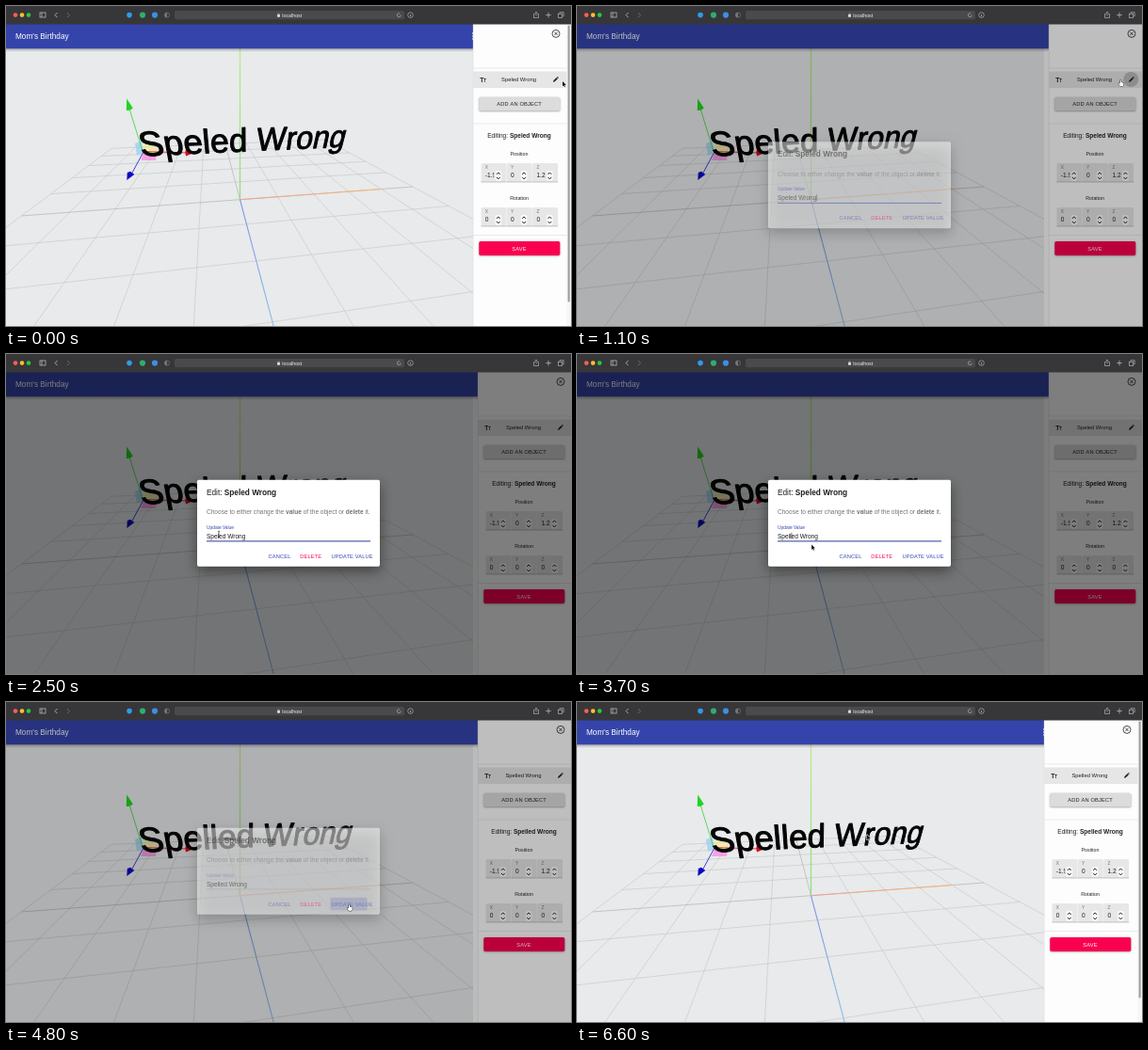
An HTML page with a canvas for the animation above (6700 ms loop, 600x340 px).

```html
<!DOCTYPE html>
<html lang="en">
<head>
<meta charset="utf-8">
<title>Scene editor</title>
<style>
  html, body { margin: 0; width: 100%; height: 100%; overflow: hidden; background: #fff; }
  canvas { display: block; width: 600px; height: 340px; }
</style>
</head>
<body>
<canvas id="stage" width="600" height="340"></canvas>
<script>
const ctx = document.getElementById('stage').getContext('2d');
const LOOP = 6700, STEP = 100;
const FONT = '"Liberation Sans", Arial, sans-serif';
const BLUE = '#3545ab', RED = '#f50057', INK = '#222';
const OLD = 'Speled Wrong', FIXED = 'Spelled Wrong';

// ---- drawing helpers ----
function rect(x, y, w, h, color, r = 0) {
  ctx.fillStyle = color;
  ctx.beginPath();
  ctx.roundRect(x, y, w, h, r);
  ctx.fill();
}

function shadowRect(x, y, w, h, color, r, blur, drop, alpha) {
  ctx.save();
  ctx.shadowColor = `rgba(0,0,0,${alpha})`;
  ctx.shadowBlur = blur;
  ctx.shadowOffsetY = drop;
  rect(x, y, w, h, color, r);
  ctx.restore();
}

function disc(x, y, r, color) {
  ctx.fillStyle = color;
  ctx.beginPath();
  ctx.arc(x, y, r, 0, 7);
  ctx.fill();
}

function ring(x, y, r, color, width) {
  ctx.strokeStyle = color;
  ctx.lineWidth = width;
  ctx.beginPath();
  ctx.arc(x, y, r, 0, 7);
  ctx.stroke();
}

function trace(pts) {
  ctx.beginPath();
  pts.forEach(([x, y], i) => i ? ctx.lineTo(x, y) : ctx.moveTo(x, y));
}

function line(pts, color, width = 0.7) {
  trace(pts);
  ctx.strokeStyle = color;
  ctx.lineWidth = width;
  ctx.stroke();
}

function poly(pts, color) {
  trace(pts);
  ctx.closePath();
  ctx.fillStyle = color;
  ctx.fill();
}

// Draws [text, bold] runs one after another.
function runs(parts, x, y, size, color, { center = false, spacing = 0 } = {}) {
  const font = bold => `${bold ? 'bold ' : ''}${size}px ${FONT}`;
  ctx.letterSpacing = spacing + 'px';
  const widths = parts.map(([s, bold]) => {
    ctx.font = font(bold);
    return ctx.measureText(s).width;
  });
  if (center) x -= widths.reduce((a, b) => a + b) / 2;
  ctx.fillStyle = color;
  parts.forEach(([s, bold], i) => {
    ctx.font = font(bold);
    ctx.fillText(s, x, y);
    x += widths[i];
  });
  ctx.letterSpacing = '0px';
}

const text = (s, x, y, size, color, opt) => runs([[s, false]], x, y, size, color, opt);

// ---- browser bar ----
function browser() {
  rect(0, 0, 600, 19.4, '#37373a');
  ['#ff5f57', '#febc2e', '#28c840'].forEach((c, i) => disc(10 + i * 7, 9.6, 2.3, c));

  const pale = '#c4c4c6';
  ctx.strokeStyle = pale;
  ctx.lineWidth = 0.7;
  ctx.strokeRect(36, 7, 6, 5);
  line([[38, 7], [38, 12]], pale);
  line([[54.5, 7], [52, 9.6], [54.5, 12.2]], pale, 0.8);
  line([[65, 7], [67.5, 9.6], [65, 12.2]], '#77777a', 0.8);

  disc(131, 9.6, 2.8, '#2f9be8');
  disc(145, 9.6, 3.1, '#2fae6b');
  disc(158, 9.6, 3.1, '#3d8fe0');
  ring(171, 9.6, 2.6, '#77777a', 0.7);
  ctx.fillStyle = '#77777a';
  ctx.beginPath();
  ctx.arc(171, 9.6, 2.6, Math.PI / 2, Math.PI * 1.5);
  ctx.fill();

  rect(179, 5, 244, 9.3, '#4a4a4c', 2);
  rect(288, 9, 3, 2.7, '#ddd', 0.4);
  ctx.strokeStyle = '#ddd';
  ctx.lineWidth = 0.5;
  ctx.beginPath();
  ctx.arc(289.5, 9, 1, Math.PI, 0);
  ctx.stroke();
  text('localhost', 293.3, 11.6, 5.3, '#f2f2f2');

  ctx.strokeStyle = pale;
  ctx.lineWidth = 0.6;
  ctx.beginPath();
  ctx.arc(417.3, 9.7, 1.9, 0, 5.2);
  ctx.stroke();
  ring(429.5, 9.6, 2.8, pale, 0.6);
  line([[429.5, 9], [429.5, 11.2]], pale);

  line([[561.8, 8.5], [560.5, 8.5], [560.5, 12.5], [565.5, 12.5], [565.5, 8.5], [564.2, 8.5]], pale, 0.6);
  line([[563, 10.5], [563, 6.2]], pale, 0.6);
  line([[561.7, 7.4], [563, 6.1], [564.3, 7.4]], pale, 0.6);
  line([[573.2, 9.6], [578.8, 9.6]], pale);
  line([[576, 6.8], [576, 12.4]], pale);
  ctx.lineWidth = 0.6;
  ctx.strokeRect(586.5, 8.2, 4.2, 4.2);
  line([[588, 8], [588, 6.7], [592.2, 6.7], [592.2, 10.8], [591, 10.8]], pale, 0.6);
}

// ---- 3D scene ----
const YAW = 8 * Math.PI / 180, PITCH = Math.asin(0.53);
const FOCAL = 209, DIST = 5.05, CX = 248.5, CY = 205.7;

function project(x, y, z) {
  const right = x * Math.cos(YAW) + z * Math.sin(YAW);
  const ahead = x * Math.sin(YAW) - z * Math.cos(YAW);
  const depth = DIST + ahead * Math.cos(PITCH) - y * Math.sin(PITCH);
  const up = ahead * Math.sin(PITCH) + y * Math.cos(PITCH);
  return [CX + FOCAL * right / depth, CY - FOCAL * up / depth];
}

function axis(end, from, to, width) {
  const a = project(0, 0, 0), b = project(...end);
  const g = ctx.createLinearGradient(...a, ...b);
  g.addColorStop(0, from);
  g.addColorStop(1, to);
  line([a, b], g, width);
}

function gizmo() {
  poly([[137, 146], [144, 143.5], [145.5, 156], [139, 158.5]], 'rgba(130,200,240,.6)');
  poly([[146, 144], [159, 144.5], [160.5, 156], [147, 156]], 'rgba(245,235,120,.5)');
  poly([[146, 157], [160, 157], [159, 164], [143, 164]], 'rgba(255,90,220,.5)');
  line([[131, 109], [145, 154]], '#35d435', 0.8);
  line([[146, 154.5], [192, 156]], '#e81818', 0.8);
  line([[146, 155], [133, 179]], '#1515d8', 0.8);
  poly([[128.2, 98.5], [134.8, 108.5], [131.5, 110.8], [127.8, 111]], '#1ed61e');
  poly([[200.5, 155.6], [191, 151.6], [190.3, 155.6], [191, 159.6]], '#d60a1c');
  poly([[128.3, 185], [128.8, 177], [132, 175.8], [136.3, 179]], '#0808c4');
}

// Each glyph gets the camera's local affine map at its centre.
function solidText(s) {
  const em = 0.72, base = 1.265, px = 100, h = 0.02;
  let x = -2.08;
  ctx.font = `${px}px ${FONT}`;
  ctx.fillStyle = ctx.strokeStyle = '#050505';
  ctx.lineWidth = 3;
  ctx.lineJoin = 'round';
  for (const ch of s) {
    const w = ctx.measureText(ch).width, k = em / px;
    const mx = x + w * k / 2, my = base + em * 0.25;
    const slope = (p, q) => [(q[0] - p[0]) / (2 * h) * k, (q[1] - p[1]) / (2 * h) * k];
    const dx = slope(project(mx - h, my, 0), project(mx + h, my, 0));
    const dy = slope(project(mx, my + h, 0), project(mx, my - h, 0));
    ctx.save();
    ctx.transform(...dx, ...dy, ...project(mx, my, 0));
    ctx.fillText(ch, -w / 2, px * 0.25);
    ctx.strokeText(ch, -w / 2, px * 0.25);
    ctx.restore();
    x += w * k;
  }
}

function scene(label) {
  ctx.save();
  ctx.beginPath();
  ctx.rect(0, 45, 496, 295);
  ctx.clip();
  rect(0, 45, 496, 295, '#e8eaec');
  for (let i = -5; i <= 5; i++) {
    const c = i ? '#c3c4c6' : '#a9aaac';
    line([project(i, 0, -5), project(i, 0, 5)], c, 0.6);
    line([project(-5, 0, i), project(5, 0, i)], c, 0.6);
  }
  axis([0, 3.2, 0], '#8fe07a', '#c3ea8c', 1.3);
  axis([4, 0, 0], '#f59a90', '#ffb85c', 0.9);
  axis([0, 0, 3.2], '#6f8ff0', '#8cc6f5', 0.9);
  gizmo();
  solidText(label);
  ctx.restore();
}

function header(edge) {
  const g = ctx.createLinearGradient(0, 45, 0, 49);
  g.addColorStop(0, 'rgba(0,0,0,.28)');
  g.addColorStop(1, 'rgba(0,0,0,0)');
  rect(0, 45, edge, 4, g);
  rect(0, 19, edge, 26.3, '#3444aa');
  text("Mom's Birthday", 10, 35, 8.25, '#fff');
  if (edge === 496) for (const y of [29, 32, 35]) disc(495.8, y, 0.8, '#fff');
}

// ---- side panel ----
function pencil(x, y) {
  ctx.save();
  ctx.translate(x, y);
  ctx.rotate(-Math.PI / 4);
  rect(-2.6, -0.9, 4.7, 1.8, INK);
  rect(2.5, -0.9, 1, 1.8, INK, 0.3);
  poly([[-2.6, -0.9], [-4, 0], [-2.6, 0.9]], INK);
  ctx.restore();
}

function field(x, y, name, value) {
  rect(x, y, 27, 20, '#e7e7e7', [1.5, 1.5, 0, 0]);
  line([[x, y + 20], [x + 27, y + 20]], '#8c8c8c', 0.5);
  text(name, x + 4.3, y + 5.8, 4.8, '#757575');
  ctx.save();
  ctx.beginPath();
  ctx.rect(x, y, 13.8, 20);
  ctx.clip();
  text(value, x + 4.3, y + 15.3, 6.6, INK);
  ctx.restore();
  const cx = x + 18.3, cy = y + 13.4;
  rect(cx - 3.4, cy - 5.4, 6.8, 10.8, '#fafafa', 2);
  line([[cx - 1.9, cy - 1.5], [cx, cy - 3.5], [cx + 1.9, cy - 1.5]], '#222', 1);
  line([[cx - 1.9, cy + 1.5], [cx, cy + 3.5], [cx + 1.9, cy + 1.5]], '#222', 1);
}

function fields(title, y, values) {
  text(title, 545, y - 8, 5.3, INK, { center: true });
  values.forEach((v, i) => field(504.5 + i * 27.3, y, 'XYZ'[i], v));
}

function button(label, y, h, fill, color) {
  shadowRect(502.3, y, 86, h, fill, 1.7, 2, 0.8, 0.35);
  text(label, 545, y + h / 2 + 2, 5.7, color, { center: true, spacing: 0.16 });
}

function panel(label, shift, ripple) {
  rect(496 + shift, 19, 104, 321, '#fdfdfd');
  line([[496.2 + shift, 19], [496.2 + shift, 340]], '#d8d8d8', 0.5);
  if (!shift) {
    rect(595.5, 19, 4.5, 321, '#f6f6f6');
    rect(596.6, 20.5, 2.1, 294, '#9e9e9e', 1);
  }
  ctx.save();
  ctx.translate(shift, 0);
  ring(584, 29.4, 4, INK, 0.8);
  line([[582.3, 27.7], [585.7, 31.1]], INK, 0.8);
  line([[585.7, 27.7], [582.3, 31.1]], INK, 0.8);
  const end = shift ? 600 : 595.5;
  for (const y of [66, 125, 243.5]) line([[496, y], [end, y]], '#dedede', 0.6);

  rect(496, 69.5, end - 496, 17.5, '#e6e6e6');
  runs([['T', true]], 503.2, 80.6, 6.8, INK);
  runs([['T', true]], 507.2, 80.6, 4.6, INK);
  text(label, 544.5, 80, 5.83, INK, { center: true });
  if (ripple) disc(583.3, 78, ripple, 'rgba(0,0,0,.18)');
  pencil(583.8, 78);

  button('ADD AN OBJECT', 96.8, 14.5, '#dcdcdc', INK);
  runs([['Editing: ', false], [label, true]], 545, 139.8, 6.55, INK, { center: true });
  fields('Position', 167, ['-1.9', '0', '1.2']);
  fields('Rotation', 214, ['0', '0', '0']);
  button('SAVE', 250, 15, '#fa0050', '#fff');
  ctx.restore();
}

// ---- dialog ----
function dialog(t) {
  const value = t < 3500 ? OLD : FIXED;
  const blurred = t >= 4600;
  ctx.save();
  ctx.translate(0, t < 1500 ? 0 : -10.5);
  shadowRect(203, 144.3, 194, 92, '#fff', 1.7, 14, 5, 0.45);
  runs([['Edit: ', false], [OLD, true]], 213, 160.2, 8.25, '#1c1c1c');
  runs([['Choose to either change the ', false], ['value', true], [' of the object or ', false],
    ['delete', true], [' it.', false]], 213, 180.8, 6.55, '#757575');
  text('Update Value', 213, 196.2, 4.85, blurred ? '#6a74b0' : BLUE);
  text(value, 213, 206, 6.55, '#1c1c1c');

  const shrink = t < 4600 ? 1 : t < 4700 ? 0.65 : t < 4800 ? 0.285 : 0;
  line([[213, 209.4], [387, 209.4]], '#8f8f8f', 0.5);
  if (shrink) line([[300 - 87 * shrink, 209.4], [300 + 87 * shrink, 209.4]], BLUE, 0.9);

  const chars = t < 1600 ? 12 : t < 3500 ? 4 : 5;
  const caretOn = t < 1600 || (t >= 2600 && t < 2900) || (t >= 3500 && t < 4000) || t === 4500;
  if (caretOn) {
    ctx.font = `6.55px ${FONT}`;
    const x = 213.3 + ctx.measureText(value.slice(0, chars)).width;
    line([[x, 200.2], [x, 207.2]], INK, 0.6);
  }

  if (t >= 4600) rect(344.5, 218.3, 39, 13.4, 'rgba(63,81,181,.36)', 1.5);
  const opt = { spacing: 0.15 };
  text('CANCEL', 278.5, 227.2, 5.7, BLUE, opt);
  text('DELETE', 312.2, 227.2, 5.7, RED, opt);
  text('UPDATE VALUE', 345.5, 227.2, 5.7, BLUE, opt);
  ctx.restore();
}

// ---- pointer ----
const PATH = [[0, 591, 80], [300, 591, 80], [800, 580, 80], [1000, 579, 80], [1200, 574.5, 77.5],
  [1500, 560, 86], [2300, 226, 191.5], [3600, 226, 191.5], [3900, 315, 234], [4300, 364.5, 215],
  [4900, 364, 215.5], [5200, 364, 215.5], [6000, 308, 141], [LOOP, 308, 141]];

function pointerAt(t) {
  const i = PATH.findIndex((p, n) => n && t <= p[0]);
  const [t0, x0, y0] = PATH[i - 1], [t1, x1, y1] = PATH[i];
  const u = (t - t0) / (t1 - t0), k = u * u * (3 - 2 * u);
  return [x0 + (x1 - x0) * k, y0 + (y1 - y0) * k];
}

function pointer(t) {
  ctx.save();
  ctx.translate(...pointerAt(t));
  ctx.lineJoin = 'round';
  if (t >= 2200 && t <= 3600) {
    line([[-1.2, -3.4], [0, -2.9], [1.2, -3.4]], INK, 0.6);
    line([[0, -2.9], [0, 2.9]], INK, 0.7);
    line([[-1.2, 3.4], [0, 2.9], [1.2, 3.4]], INK, 0.6);
  } else {
    const hand = (t >= 900 && t < 1200) || (t >= 4200 && t < 4900);
    const shape = hand
      ? [[0, 0], [1, 0], [1.1, 2.2], [3.7, 2.9], [3.6, 5], [2.9, 6.4], [0, 6.4], [-1.8, 3.6], [-1, 3.2], [0, 4]]
      : [[0, 0], [0, 5.4], [1.2, 4.3], [2.1, 6.2], [3, 5.8], [2.1, 3.9], [3.8, 3.8]];
    const [body, edge] = hand ? ['#fff', '#111'] : ['#111', '#fff'];
    trace(shape);
    ctx.closePath();
    ctx.strokeStyle = edge;
    ctx.lineWidth = hand ? 0.8 : 1.1;
    ctx.stroke();
    poly(shape, body);
  }
  ctx.restore();
}

// ---- timeline ----
function draw(t) {
  const open = t < 1100 || t >= 4900 ? 0 : t < 1200 || t >= 4800 ? 0.5 : 1;
  const shift = t >= 1100 && t < 5000 ? 5 : 0;
  const label = t < 4800 ? OLD : FIXED;
  const ripple = t < 900 || t >= 1500 ? 0 : t < 1100 ? 7 : 8;

  rect(0, 0, 600, 340, '#fafafa');
  scene(label);
  header(496 + shift);
  panel(label, shift, ripple);
  if (open) {
    rect(0, 19, 600, 321, `rgba(0,0,0,${open * 0.5})`);
    ctx.globalAlpha = open;
    dialog(t);
    ctx.globalAlpha = 1;
  }
  browser();
  pointer(t);
}

const start = performance.now();
function tick() {
  const t = (performance.now() - start) % LOOP;
  draw(Math.floor(t / STEP) * STEP);
  requestAnimationFrame(tick);
}
tick();
</script>
</body>
</html>
```
